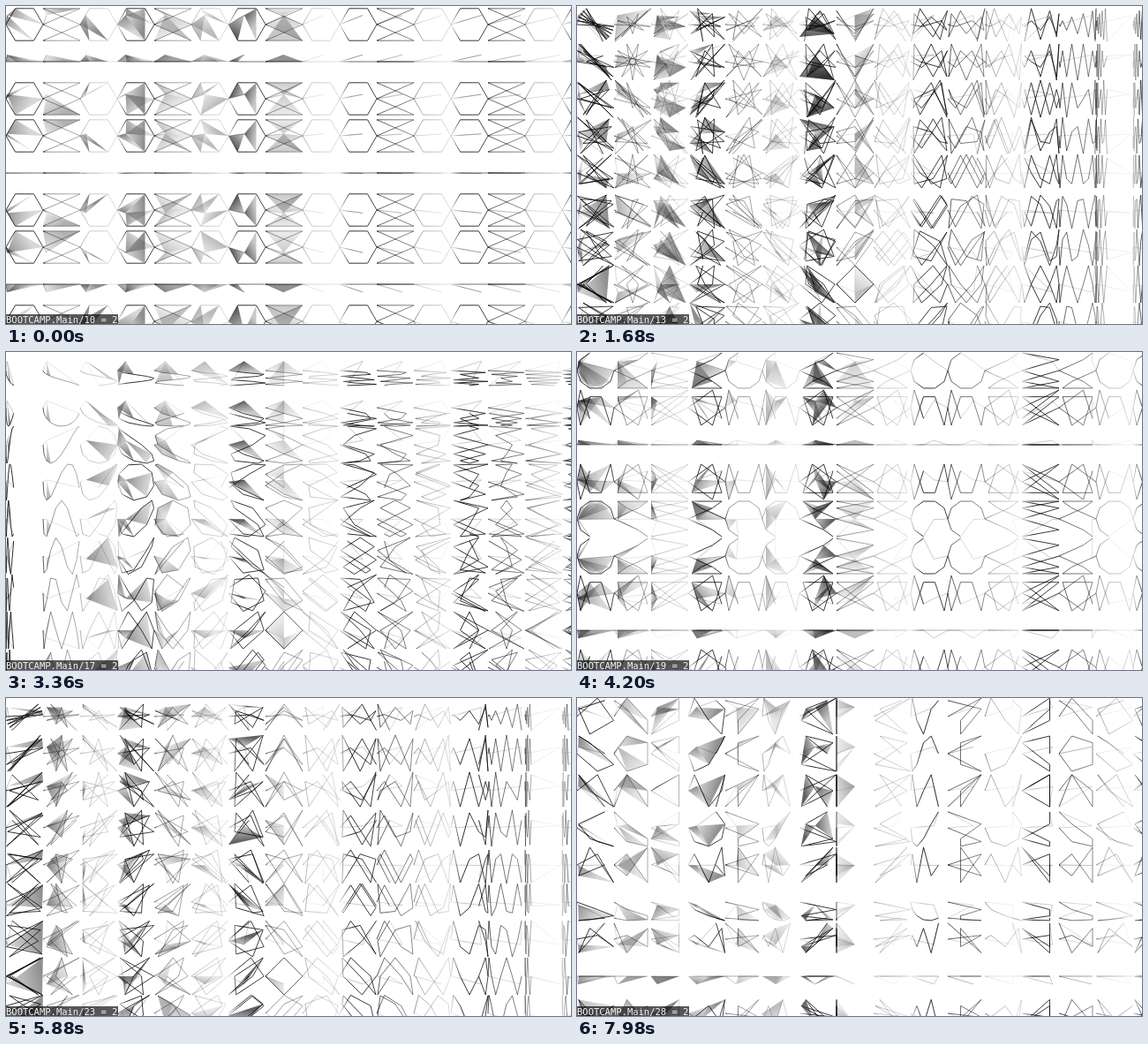
An HTML page with a canvas for the animation above (8000 ms loop, 640 px wide and 360 px high).

```html
<!DOCTYPE html>
<html lang="en">
<head>
<meta charset="utf-8">
<title>Polygon grid</title>
<style>
  html, body { margin: 0; width: 100%; height: 100%; overflow: hidden; background: #fff; }
  canvas { position: absolute; left: 0; top: 0; width: 640px; height: 360px; }
  #label {
    position: absolute; left: 0; top: 349px; width: 127px; height: 11px;
    overflow: hidden; background: rgba(0, 0, 0, .66); color: #f4f4f4;
    font: 10.5px/12px "DejaVu Sans Mono", monospace; white-space: pre;
  }
</style>
</head>
<body>
<canvas id="stage" width="640" height="360"></canvas>
<div id="label"></div>
<script>
const ctx = document.getElementById('stage').getContext('2d');
const label = document.getElementById('label');

const LOOP = 8000, BEAT = 420;
const CELL = 42, RADIUS = 21, GROUP = 126, DEPTH = 0.066;
const FILLED_COLS = 8;

// Each pose: angle step in degrees, vertex count, start angle.
const POSES = [
  [60, 7, 180], [150, 8, 180], [-12, 9, 0], [186, 12, 180], [72, 6, 180],
  [90, 5, 180], [114, 9, 180], [-6, 10, 180], [168, 8, 180], [36, 8, 0],
  [102, 7, 180], [162, 7, 144], [45, 9, 180], [174, 9, 180], [20, 8, 0],
  [30, 7, 0], [132, 9, 180], [12, 10, 180], [96, 6, 180]
];
const DIAMONDS = 5;

// Fill strength per column.
const TONES = [.5, .35, .5, .5, .28, .3, .7, .24];

const rad = deg => deg * Math.PI / 180;

function hash(...keys) {
  const n = keys.reduce((sum, key, i) => sum + key * [12.99, 78.23, 37.72][i], 1);
  const s = Math.sin(n) * 43758.5453;
  return s - Math.floor(s);
}

// Ink fades from black to pale across every group of three columns;
// the groups that hold fills fade sooner.
function makeInk(strength) {
  const width = GROUP * 6;
  const ink = ctx.createLinearGradient(0, 0, width, 0);
  const stop = (x, alpha) => ink.addColorStop(x / width, `rgba(0,0,0,${alpha * strength})`);
  for (let g = 0; g < 6; g++) {
    const x = g * GROUP, fade = g < 3 ? .7 : 1;
    stop(x, g ? .14 : .85);
    stop(x + 12, .9);
    stop(x + 41, .78);
    stop(x + 46, .65 * fade);
    stop(x + 82, .5 * fade);
    stop(x + 92, .34 * fade);
    stop(x + GROUP - .5, .14);
  }
  return ink;
}
const ink = makeInk(.92), softInk = makeInk(.55), faintInk = makeInk(.5);

function trace(points) {
  ctx.beginPath();
  points.forEach(([x, y], i) => i ? ctx.lineTo(x, y) : ctx.moveTo(x, y));
}

function strokePath(points, style, width) {
  trace(points);
  ctx.strokeStyle = style;
  ctx.lineWidth = width;
  ctx.stroke();
}

function fillFacet(points, tone, flip) {
  const [[x0, y0], [x1, y1], [x2, y2]] = points;
  const shade = ctx.createLinearGradient(x0, y0, (x1 + x2) / 2, (y1 + y2) / 2);
  shade.addColorStop(flip ? 1 : 0, `rgba(30,30,30,${tone})`);
  shade.addColorStop(flip ? 0 : 1, `rgba(60,60,60,${tone * .4})`);
  trace(points);
  ctx.fillStyle = shade;
  ctx.fill();
}

function drawFacets(pose, col, vertices, hub) {
  const count = vertices.length, soft = pose === DIAMONDS;
  const tone = TONES[col] * (soft ? .32 : 1);
  const stride = soft || col % 3 === 1 ? 1 : 2;
  const share = (soft ? 3.2 : 2.4) / count;
  for (let i = 0; i < count - 1; i++) {
    const chance = hash(pose, col, i);
    if (chance > share) continue;
    const next = vertices[(i + stride) % count];
    fillFacet([hub, vertices[i], next], tone, chance < share / 2);
  }
}

function drawInset(vertices, cx, cy) {
  const inner = vertices.map(([x, y]) => [cx + (x - cx) * .55, cy + (y - cy) * .55]);
  trace(inner);
  ctx.fillStyle = '#fff';
  ctx.fill();
  strokePath(inner, '#ccc', .7);
}

function drawCell(pose, col, row) {
  const [step, count, start] = POSES[pose];
  const cx = (col + .5) * CELL, cy = (row + .5) * CELL;
  const a = 2 * col + 1, b = 2 * row + 1;
  const vertices = Array.from({ length: count }, (_, i) => {
    const angle = rad(start + i * step);
    return [cx + RADIUS * Math.cos(a * angle), cy + RADIUS * Math.sin(b * angle)];
  });
  // The hub stands nearer to the viewer and shifts away from the stage centre.
  const hub = [cx + (cx - 320) * DEPTH, cy + (cy - 180) * DEPTH];
  const filled = col < FILLED_COLS, diamonds = pose === DIAMONDS;

  if (filled) {
    drawFacets(pose, col, vertices, hub);
    if (diamonds && col % 4 === 3) drawInset(vertices, cx, cy);
  }

  // A polygon collapsed to a level line shows only as a hairline.
  const flat = Math.abs(Math.sin(b * rad(step))) < .01;
  strokePath(vertices, diamonds && filled ? softInk : ink, flat ? .4 : 1);
  strokePath([vertices[count - 1], hub, vertices[0]], faintInk, .5);
}

function draw(pose) {
  ctx.fillStyle = '#fff';
  ctx.fillRect(0, 0, 640, 360);
  ctx.lineJoin = 'bevel';
  for (let row = 0; row < 9; row++)
    for (let col = 0; col < 16; col++) drawCell(pose, col, row);
  label.textContent = `BOOTCAMP.Main/${pose + 10} = 2`;
}

let shown = -1;
function tick() {
  const time = performance.now() % LOOP;
  const pose = Math.max(0, Math.floor(time / BEAT) - 1);
  if (pose !== shown) draw(shown = pose);
  requestAnimationFrame(tick);
}
tick();
</script>
</body>
</html>
```
